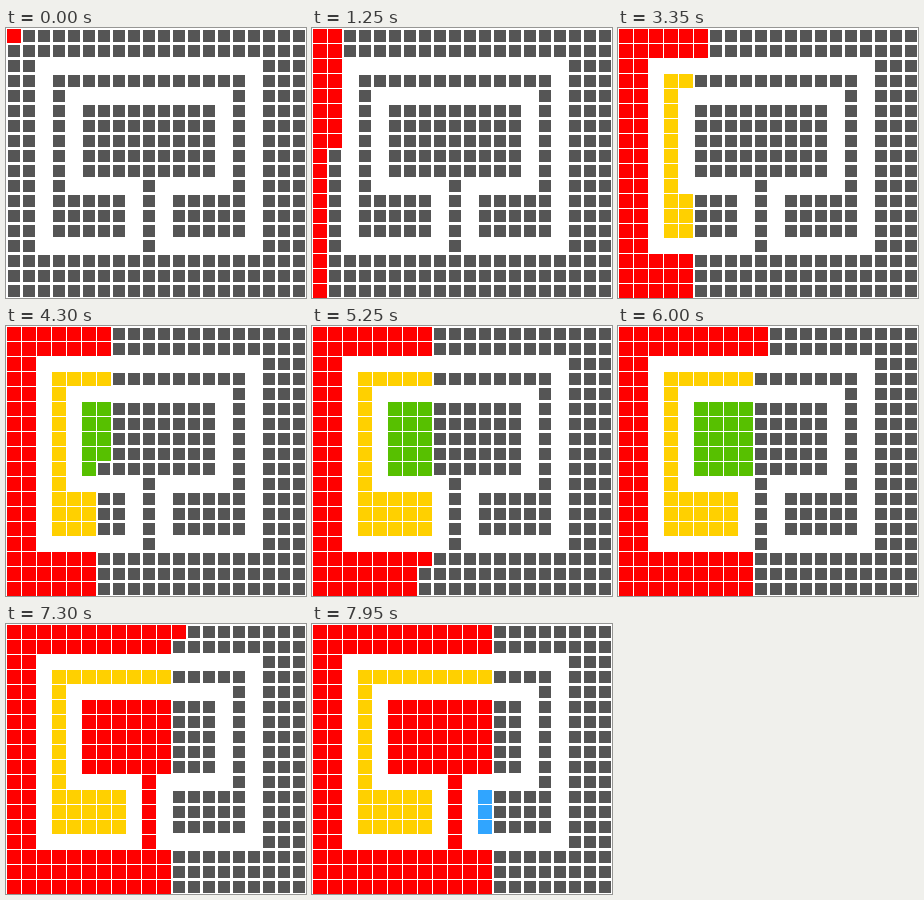
Animation, 300 px wide and 270 px high, one loop 8000 ms. Source, as an HTML page with a canvas:

```html
<!DOCTYPE html>
<html lang="en">
<head>
<meta charset="utf-8">
<title>Connected regions</title>
<style>
html, body { margin: 0; width: 100%; height: 100%; overflow: hidden; background: #fff; }
canvas { display: block; }
</style>
</head>
<body>
<canvas id="stage" width="300" height="270"></canvas>
<script>
const CELL = 15, STEP_MS = 50, STEPS = 160;
const UNVISITED = '#555555';
const LABEL_COLORS = ['#ff0000', '#ffd000', '#57c000', '#30a5ff'];

const full = '####################';
const block = '##.#.#########.#.###';
const rooms = '##.#####.#.#####.###';
const rows = [
  full, full,
  '##...............###',
  '##.#############.###',
  '##.#...........#.###',
  block, block, block, block, block,
  '##.#.....#.....#.###',
  rooms, rooms, rooms,
  '##.......#.......###',
  full, full, full
];

// Filled cells in scan order: down each column, columns left to right.
const cells = [];
for (let x = 0; x < full.length; x++)
  rows.forEach((row, y) => { if (row[x] === '#') cells.push({ x, y }); });

const key = (x, y) => x + ',' + y;

// Label the first `count` cells, merging regions as soon as they touch.
function labelCells(count) {
  const labels = new Map();
  let next = 0;
  for (const { x, y } of cells.slice(0, count)) {
    const touching = [labels.get(key(x, y - 1)), labels.get(key(x - 1, y))]
      .filter(label => label !== undefined);
    const label = touching.length ? Math.min(...touching) : next++;
    labels.set(key(x, y), label);
    for (const other of touching)
      if (other !== label)
        labels.forEach((value, k) => { if (value === other) labels.set(k, label); });
  }
  return labels;
}

const ctx = document.getElementById('stage').getContext('2d');

function draw(step) {
  const labels = labelCells(step + 1);
  ctx.fillStyle = '#fff';
  ctx.fillRect(0, 0, 300, 270);
  for (const { x, y } of cells) {
    const label = labels.get(key(x, y));
    const visited = label !== undefined;
    const inset = visited ? 1 : 2, size = visited ? 14 : 12;
    ctx.fillStyle = visited ? LABEL_COLORS[label] : UNVISITED;
    ctx.fillRect(x * CELL + inset, y * CELL + inset, size, size);
  }
}

const start = performance.now();
let shown = -1;
function tick() {
  const step = Math.floor((performance.now() - start) / STEP_MS) % STEPS;
  if (step !== shown) draw(shown = step);
  requestAnimationFrame(tick);
}
tick();
</script>
</body>
</html>
```
